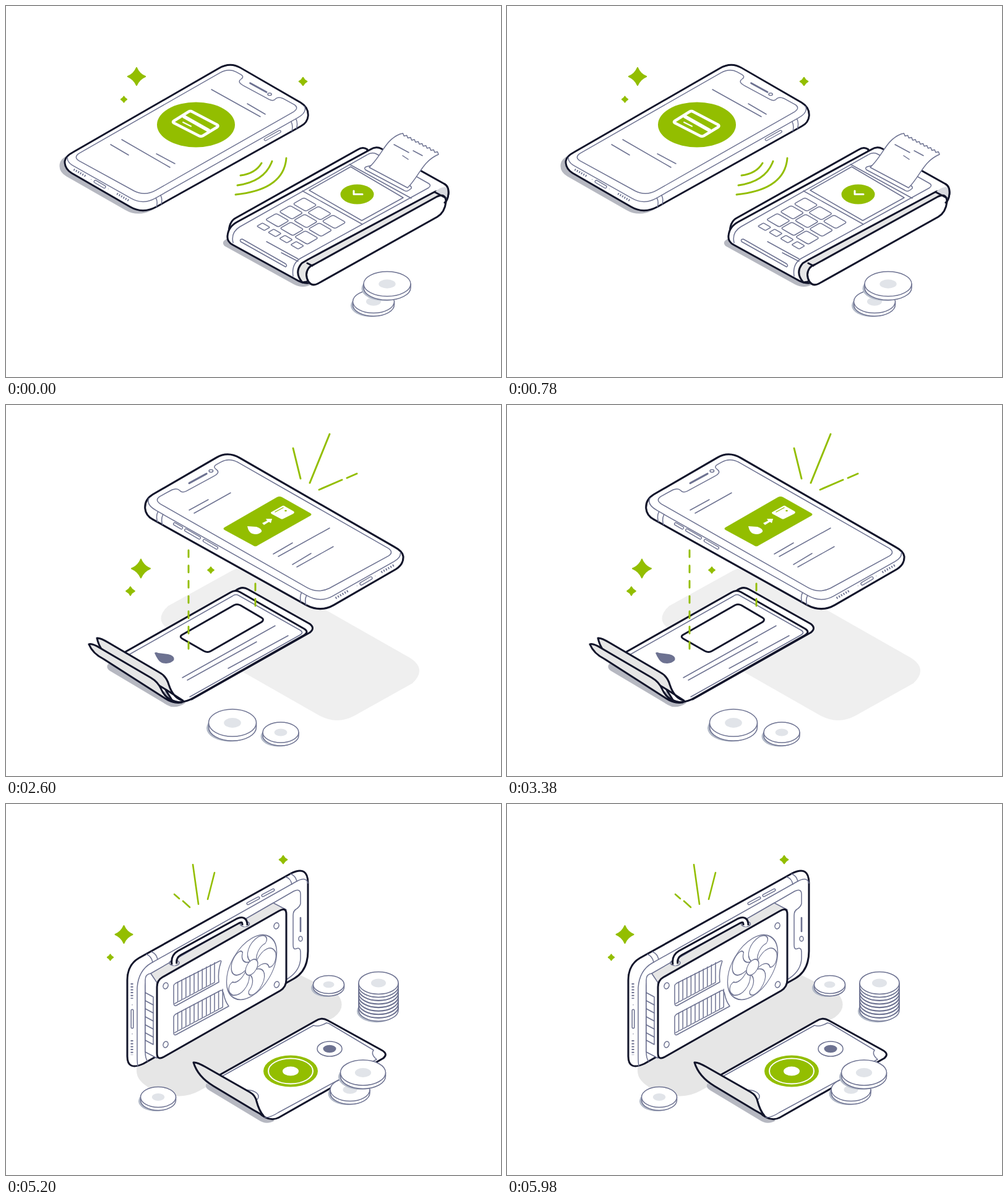
An HTML page that plays this animation: 800x600 px, repeating every 6500 ms.

```html
<!DOCTYPE html>
<html lang="en">
<head>
<meta charset="utf-8">
<title>Wallet scenes</title>
<style>
  html, body { margin: 0; width: 100%; height: 100%; overflow: hidden; background: #fff; }
  svg { display: block; width: 800px; height: 600px; }
  path, ellipse { stroke-linecap: round; stroke-linejoin: round; }
  .ink { fill: none; stroke: #12152b; stroke-width: 3; }
  .thin { fill: none; stroke: #6d7291; stroke-width: 1.5; }
  .ray { fill: none; stroke: #93be00; stroke-width: 2.9; }
  .white { fill: none; stroke: #fff; stroke-width: 2; }
  .paper { fill: #fff; }
  .pale { fill: #e6e6e6; }
  .green { fill: #93be00; }
  .slate { fill: #6d7291; }
  .shade { fill: #b6b8c1; }
  .phone .ink { stroke-width: 3.4; }
  .phone .thin { stroke-width: 1.7; }
  .scene { visibility: hidden; animation: show 6.5s step-end infinite; }
  @keyframes show {
    0% { visibility: visible; }
    20%, 100% { visibility: hidden; }
  }
</style>
</head>
<body>
<svg id="stage" viewBox="0 0 800 600"></svg>
<script>
const path = (cls, d, more = '') => `<path class="${cls}" d="${d}" ${more}/>`;
const oval = (cls, x, y, rx, ry, more = '') =>
  `<ellipse class="${cls}" cx="${x}" cy="${y}" rx="${rx}" ry="${ry}" ${more}/>`;

// Segments as "x1 y1 x2 y2, ...", with an optional stroke width
const lines = (cls, list, width) => path(cls, list.split(',').map(s => {
  const [a, b, c, d] = s.trim().split(' ');
  return `M${a} ${b}L${c} ${d}`;
}).join(''), width ? `style="stroke-width:${width}"` : '');

const star = (x, y, r) => {
  const k = r * .27, e = r - 1;
  return path('green', `M0 ${-e}Q${k} ${-k} ${e} 0Q${k} ${k} 0 ${e}Q${-k} ${k} ${-e} 0Q${-k} ${-k} 0 ${-e}Z`,
    `transform="translate(${x} ${y})" stroke="#93be00" stroke-width="2"`);
};

const disc = (x, y, rx, ry, t) => path('paper thin',
  `M${x - rx} ${y}v${t}a${rx} ${ry} 0 0 0 ${2 * rx} 0v${-t}`) + oval('paper thin', x, y, rx, ry);

const coin = (x, y, rx, ry, t) =>
  oval('', x - 3.5, y + t + 1.5, rx, ry, 'fill="#b3bac8"') + disc(x, y, rx, ry, t) +
  oval('', x, y, rx * .36, ry * .36, 'fill="#e1e4e9"');

// Rounded rectangle lying on the ground plane, a wide and b deep
const key = (x, y, a, b) => {
  const at = (u, v) => `${x + (u * a - v * b) / 2} ${y + (u * a + v * b) * .29}`;
  const s = .72;
  return path('thin', `M${at(-s, -1)}L${at(s, -1)}Q${at(1, -1)} ${at(1, -s)}L${at(1, s)}Q${at(1, 1)} ${at(s, 1)}` +
    `L${at(-s, 1)}Q${at(-1, 1)} ${at(-1, s)}L${at(-1, -s)}Q${at(-1, -1)} ${at(-s, -1)}Z`);
};

const keys = (x, y, cols, rows, col, row, a, b) => {
  let out = '';
  for (let r = 0; r < rows; r++)
    for (let c = 0; c < cols; c++)
      out += key(x + c * col[0] + r * row[0], y + c * col[1] + r * row[1], a, b);
  return out;
};

// Sawtooth edge from one point to another, as path commands
const teeth = (x1, y1, x2, y2, n, depth) => {
  const dx = (x2 - x1) / n, dy = (y2 - y1) / n, len = Math.hypot(dx, dy);
  const nx = -dy / len * depth, ny = dx / len * depth;
  let d = '';
  for (let i = 0; i < n; i++)
    d += `L${x1 + dx * (i + .5) + nx} ${y1 + dy * (i + .5) + ny}L${x1 + dx * (i + 1)} ${y1 + dy * (i + 1)}`;
  return d;
};

const grille = d => path('thin', d, 'style="stroke-width:4;stroke-linecap:butt" stroke-dasharray="2 2.7"');

const button = (x1, y1, x2, y2, w = 5) =>
  lines('thin', `${x1} ${y1} ${x2} ${y2}`, w) + lines('white', `${x1} ${y1} ${x2} ${y2}`, w - 3);

const phone = (matrix, { shadow = true, mirrored = false } = {}) => `<g class="phone" transform="matrix(${matrix})">` +
  (shadow ? path('shade', 'M152 338Q134 346 134 358Q133 371 147 379L259 443Q283 457 310 443L320 430Z') : '') +
  path('paper ink', 'M160 333L436 174Q458 161 478 173L592 239Q607 248 606 264Q605 277 592 284L318 437Q292 451 268 437L157 373Q143 364 144 350Q145 341 160 333Z') +
  path('thin', 'M149 343Q148 352 160 359L270 421Q293 434 317 420L586 268Q605 257 599 246') +
  path('thin', 'M170 336L439 182Q456 173 470 181L479 186Q485 190 479 194Q470 200 484 207L532 233Q540 237 544 232Q549 227 558 231L580 243Q589 249 579 256L316 406Q296 417 276 407L170 349Q161 343 170 336Z') +
  lines('thin', '496 202 527 219', 3.4) +
  (mirrored ? oval('thin', 488, 197, 3.6, 2.3) : oval('thin', 533, 223, 3.6, 2.3)) +
  path('thin', 'M317 420Q321 428 318 437M326 415Q330 423 327 432M574 275Q578 284 575 293M583 270Q587 278 584 288') +
  (mirrored ? button(541, 299, 553, 292, 6) + button(509, 317, 533, 303, 6) + button(478, 335, 500, 322, 6)
            : button(525, 309, 552, 294, 6)) +
  grille('M161 366L185 379.500M243 412L267 426') +
  button(202, 389, 219, 399, 6.5) +
  path('slate', 'M193.500 384.500h1.200v1h-1.200zM226 402.500h1.200v1h-1.200z') + '</g>';

const checkout = () =>
  phone('.851 0 0 .851 -27.5 -47.1') +
  oval('green', 307, 192, 63, 36.5) +
  path('white', 'M271 186L295 171Q298 169 301 171L341 192Q344 194 341 196L318 210Q315 211.500 312 210L271 189Q269 187.500 271 186Z', 'style="stroke-width:4.6"') +
  lines('white', '288 179 327 201', 6) +
  lines('white', '286 188 299 194.5') +
  lines('thin', '332 135 411 179, 390 158 419 175, 187 216 265 261, 169 224 198 241, 243 239 273 255') +
  path('ray', 'M379 274Q403 271 413 254M374 290Q418 284 430 251M371 305Q449 297 453 246') +
  star(211, 114, 15.2) + star(480, 122, 7.3) + star(190.5, 151, 5.6) +
  // card terminal
  path('shade', 'M361 375Q346 380 353 388L465 450Q480 458 494 450L480 440Z') +
  path('paper ink', 'M360 368Q360 349 371 343L569 232Q577 227 584 232L584 250Z') +
  path('paper ink', 'M358 372Q359 357 374 349L589 232Q598 226 607 231L709 288Q716 292 715 304Q714 314 708 320L497 446Q484 452 468 442L366 386Q357 381 358 372Z') +
  path('thin', 'M367 383Q363 366 378 357L583 241Q592 235 600 240L683 287Q688 290 683 294L476 408Q461 417 464 437') +
  lines('thin', '479 299 576 353, 555 256 655 311') +
  path('thin', 'M490 298L557 260L642 310L575 347Z') +
  oval('green', 567.5, 304.5, 27, 16) + path('white', 'M562 299V304.500H576', 'style="stroke-width:3"') +
  keys(483, 321, 3, 3, [23.5, 14], [-22.3, 12.7], 20.5, 17.5) +
  keys(416, 357, 4, 1, [18.2, 10], [0, 0], 12, 9) +
  lines('thin', '421 381 472 409, 445 399 472 413') +
  path('thin', 'M382 377L452 417Q455 420 452 422L379 381Q377 377 382 377Z') +
  path('pale ink', 'M479 447Q465 431 478 416L488 410L690 302Q701 295 711 306L497 436L486 446Z') +
  path('', 'M693 301Q704 290 714 294Q715 310 710 314Z', 'fill="#d8d9df"') +
  path('paper ink', 'M498 418L697 308Q711 302 711 317Q709 334 697 341L504 449Q495 454 489 446Q482 434 489 424Q492 420 498 418Z') +
  path('ink', 'M487 416L495 420M693 301L710 310M709 288Q716 292 715 304Q714 314 709 318') +
  // receipt
  path('paper thin', 'M582 260Q578 262 581 265L643 298Q647 301 651 298L655 295Q656 292 652 290L590 258Z') +
  path('paper thin', `M587 261C609 240 612 217 637 207${teeth(637, 207, 699, 240, 10, -3)}C673 251 668 275 649 294Z`) +
  lines('thin', '627 224 651 237, 658 234 673 242, 641 242 650 248') +
  coin(594, 478, 33.5, 18.5, 5) + coin(616, 449.5, 38, 20, 6);

const transfer = () =>
  phone('.879 0 0 .872 -11.6 -8.1') +
  lines('white', '374 315 413 293', 8) +
  path('paper ink', 'M368 318L376 313Q382 309 388 312L399 318L389 325L430 324L434 299L425 304L415 299Q408 295 414 291L422 287') +
  oval('green', 346, 229.5, 55.5, 32) + oval('white', 346, 229.5, 48.5, 27.5) +
  path('white', 'M336 218V233.500H367', 'style="stroke-width:4.2"') +
  lines('thin', '244 239 275 256, 235 246 317 291, 224 250 255 267, 219 286 273 316, 250 294 281 311') +
  lines('ray', '469 110 462 142, 475 152 539 116, 495 164 518 160, 526 158 540 156') +
  star(102, 248, 15.7) + star(81, 286, 5.7) + star(390, 108, 7.8) +
  coin(603.5, 203, 37, 21, 6) + coin(215, 439, 30, 17.5, 4.5) +
  phone('.879 0 0 .872 192.4 106.9') +
  lines('thin', '422 355 538 420') +
  keys(422, 374.5, 6, 3, [16, 9.1], [-17.5, 9.6], 11, 9) +
  path('thin', 'M374 414L382 409L441 441L433 446Z') +
  path('paper thin', 'M510 320L522 312Q532 305 544 311L585 333Q597 341 588 348L577 354Q566 360 555 354L512 331Q502 326 510 320Z') +
  lines('thin', '532 315 568 335, 524 318 542 328, 523 325 539 335') +
  path('paper thin', 'M494 362L503 356Q514 348 526 355L564 375Q575 382 566 389L556 394Q546 399 534 393L495 373Q486 368 494 362Z') +
  lines('thin', '519 371 534 379, 530 363 543 370, 537 376 557 388') +
  path('green', 'M587 308L598 302Q606 297 616 302L659 324Q668 330 660 336L650 343Q641 348 631 344L588 322Q579 316 587 308Z') +
  path('paper', 'M593 313L601 306L621 316L613 322Z') +
  oval('green', 612, 315.5, 1.4, 1) +
  lines('white', '629 321 646 331, 624 325 637 332');

const sweep = () =>
  path('', 'M262 325L365 268Q385 258 405 268L653 409Q681 427 657 450L564 502Q535 518 506 502L264 364Q238 347 262 325Z', 'fill="#efefef"') +
  path('shade', 'M166 418Q160 424 168 430L260 485Q273 493 290 482L270 470Z') +
  path('paper ink', 'M190 404L370 301Q381 292 391 298L491 354Q500 361 491 368L300 476Z') +
  path('paper ink', 'M188 402L363 303Q371 298 379 303L482 362Q490 367 482 372L304 473Q288 483 270 480L245 440Z') +
  path('thin', 'M200 403L366 309Q371 305 376 308L475 364Q482 368 475 372L297 472') +
  path('pale ink', 'M147 377Q152 376 165 384L247 432Q259 438 263 452Q270 474 286 478L258 460L172 410Q152 400 147 377Z') +
  path('pale ink', 'M134 387Q139 385 152 393L234 441Q246 448 251 460Q260 480 284 481Q270 483 258 475L158 411Q140 402 134 387Z') +
  path('paper ink', 'M284 372L368 324Q373 321 379 324L413 344Q418 347 413 351L331 398Q326 401 320 398L285 378Q280 375 284 372Z') +
  path('slate', 'M240 401Q242 399 246 401L262 403Q274 406 271 413Q264 420 252 417Q246 415 240 401Z') +
  lines('thin', '285 441 435 357, 293 445 405 383, 359 426 456 373') +
  path('ray', 'M295 235V395', 'stroke-dasharray="11 13.7"') +
  path('ray', 'M403 289V325', 'stroke-dasharray="11 13.7"') +
  phone('-.903 0 0 .903 772 -71.3', { shadow: false, mirrored: true }) +
  path('green', 'M353 198L438 149Q442 147 446 149L492 175Q495 177 492 179L407 227Q403 230 399 227L353 202Q350 200 353 198Z') +
  path('paper', 'M390 196L405 197Q414 200 413 205Q407 211 398 208Q392 206 390 196Z') +
  path('paper', 'M414 191L422 187L420 184L430 184L428 191L425 189L417 194Z') +
  path('paper', 'M429 173L447 163Q449 162 451 164L465 172Q467 174 464 176L448 184Q446 185 444 184L429 176Q427 174 429 173Z') +
  oval('green', 452, 171, 1.8, 1.3) + lines('ray', '435 173 448 166', 1.4) +
  lines('thin', '296 170 327 153, 304 175 363 142, 432 241 463 223, 440 245 523 199, 463 258 493 240, 470 262 529 229') +
  lines('ray', '464 70 476 119, 523 47 491 126, 506 137 543 121, 551 118 567 111') +
  star(218, 264.5, 16) + star(201, 301, 7.8) + star(331, 267, 5.8) +
  coin(366, 514, 38.5, 22, 7) + coin(444, 529.5, 29, 16.5, 5);

const vault = () =>
  path('paper ink', `M137 291${teeth(137, 291, 353, 167, 18, 5)}L403 195L180 319L136 294Z`) +
  lines('thin', '179 294 230 265, 187 298 213 284') +
  path('paper', 'M350 419L418 455Q427 459 438 453L620 330L565 299Z') +
  path('pale', 'M350 416L375 431L590 312L566 299Z') +
  path('ink', 'M350 419L416 454Q427 460 438 453M565 299L620 330') +
  path('pale ink', 'M438 453Q445 448 451 433Q455 421 464 417L650 310Q663 303 668 306Q668 315 660 325Q656 331 646 335Z') +
  [0, 1, 2, 3, 4].map(i => oval('thin', 416 + i * 18.9, 422 - i * 10.7, 8.8, 5)).join('') +
  lines('thin', '504 365 538 347, 512 371 578 334') +
  phone('1 0 0 1 0 0') +
  lines('thin', '411 219 445 237, 426 210 518 262, 492 238 526 256, 244 313 336 364, 311 341 345 360') +
  [0, 1, 2, 3].map(i => oval('green', 213.5 + i * 26.6, 338.5 + i * 15, 12.2, 7)).join('') +
  oval('paper', 266.7, 368.5, 7, 3.6) +
  // dial
  oval('paper thin', 375, 293, 63, 34.5) +
  path('paper thin', 'M320 277L337 259H414L430 277') +
  path('paper', 'M321 279L338 255H412L429 279Q410 305 375 305Q340 305 321 279Z') +
  path('paper thin', 'M333 262Q326 266 327 277Q331 302 375 303Q419 302 423 277Q424 266 417 262') +
  path('paper', 'M337 235H413V272Q396 290 375 290Q352 290 337 272Z') +
  path('thin', 'M336 235V274M414 235V274M342 283Q375 303 409 283') +
  oval('paper thin', 375, 235.5, 39, 23) + oval('slate', 374.5, 234.5, 26.5, 14) +
  lines('thin', '344 251 344 267, 353 257 353 275, 362 267 362 278, 372 259 372 279, 382 258 382 277, 391 257 391 275, 401 252 401 267') +
  lines('ray', '546 136 539 173, 553 184 627 142, 576 198 602 193, 612 191 628 189', 3.2) +
  star(339, 118, 17.7) + star(396, 141, 8.7) + star(302.5, 157, 6.2) +
  coin(223.5, 168, 43, 24.5, 7) + coin(587.5, 468, 39, 22.5, 6) + coin(613, 436, 44, 24, 7);

const slats = (top, bottom, slope, n) => {
  let d = '';
  for (let i = 1; i <= n; i++) {
    const x = 271 + i * 6.6, rise = slope * (x - 274);
    d += `M${x} ${top - rise}V${bottom - rise - 4}l-5 2.700`;
  }
  return path('thin', d);
};

const fan = () => {
  let blades = '';
  for (let a = 0; a < 360; a += 72)
    blades += path('thin', 'M-4-11C-15-24-10-41 9-44C25-43 28-33 23-28C14-28 7-20 8-9', `transform="rotate(${a + 5})"`);
  return `<g transform="matrix(.866 -.5 0 1 397 264)">${oval('paper thin', 0, 0, 46.8, 46.8)}${blades}${oval('paper thin', 0, 0, 11.5, 11.5)}</g>`;
};

const mining = () => {
  const handle = 'M272 259Q270 247 280 241L375 189Q386 184 386 196';
  const screws = [[258, 294], [258, 389], [437, 197], [437.5, 292]];
  return path('pale', 'M212 424Q206 446 235 461L258 469Q288 478 314 463L530 345Q553 328 534 305L470 274Z') +
    path('paper ink', 'M196 285Q196 260 215 249L461 112Q488 99 488 128V238Q488 269 466 282L222 420Q196 432 196 408Z') +
    path('thin', 'M213 424Q212 418 212 408V297Q214 269 235 257L468 126Q485 116 488 128') +
    path('thin', 'M229 416Q225 412 225 400V294Q226 279 240 271L465 141Q476 136 476 146V161Q475 166 469 170Q464 173 464 180V228Q464 236 469 234Q476 231 476 240V250Q475 271 453 284') +
    path('thin', 'M227 243Q235 246 237 256M235 239Q243 242 245 251M452 118Q460 120 462 130M460 113Q468 116 470 125') +
    button(391, 161, 408, 152) + button(415, 148, 432, 139) +
    lines('thin', '476 184 476 206', 2.6) + oval('thin', 476, 218, 3, 4) +
    grille('M203.500 290V315M203.500 382V406') +
    button(204, 334, 204, 361, 5) + path('slate', 'M203.500 324h1v1.500h-1zM203.500 371h1v1.500h-1z') +
    // graphics card
    path('paper thin', 'M225 285Q225 275 234 274L244 288V411L225 401Z') +
    path('paper thin', 'M225 305L238 312V389L225 382Z') +
    path('thin', [0, 1, 2, 3, 4].map(i => `M225 ${318 + i * 13}l13 7`).join('')) +
    path('pale thin', 'M234 274L432 160L453 171L244 289Z') +
    path('paper ink', 'M244 296Q244 285 253 280L441 173Q453 166 453 178V284Q453 296 443 302L255 409Q244 415 244 403Z') +
    oval('thin', 272, 257, 8, 4.5) + oval('thin', 386, 194, 7.5, 4.5) +
    path('ink', handle, 'style="stroke-width:11;stroke-linecap:butt"') +
    path('white', handle, 'style="stroke-width:5"') +
    screws.map(([x, y]) => oval('thin', x, y, 3.9, 5, `transform="rotate(20 ${x} ${y})"`)).join('') +
    path('thin', 'M271 294Q271 292 274 290L345 254Q349 252 347 257Q342 272 344 288L275 326Q271 327 271 322Z') +
    slats(290, 326, .53, 10) +
    path('thin', 'M271 345Q271 342 274 340L346 302Q350 299 352 308Q354 319 360 327L275 373Q271 375 271 370Z') +
    slats(340, 373, .53, 12) +
    fan() +
    // banknote
    path('shade', 'M324 452Q320 459 330 464L408 511Q421 520 434 512L400 490Z') +
    path('paper ink', 'M342 440L500 351Q510 344 520 350L607 398Q618 404 610 411L441 507Q428 514 413 503Z') +
    path('thin', 'M348 441L497 358Q506 361 518 354L522 355L594 398Q589 405 599 413L440 499Q428 507 418 507') +
    oval('thin', 523, 396, 20, 12) + oval('slate', 523, 396, 10.5, 6.2) +
    oval('thin', 389, 473, 19, 10.5) + oval('slate', 389, 473, 9.5, 5) +
    path('pale ink', 'M303 418Q308 417 322 425L394 466Q403 471 405 481Q409 496 416 504L400 495L335 456Q310 441 303 418Z') +
    oval('green', 460, 432, 44, 25.5) + oval('white', 460, 432, 36, 20.5) + oval('paper', 460, 432, 13, 7.5) +
    lines('ray', '302 98 311 162, 337 111 326 154, 272 146 280 153, 286 157 297 167', 2.6) +
    star(190.5, 211, 15) + star(448, 90, 7.3) + star(168.5, 248, 5.6) +
    coin(521.5, 292, 25, 14.5, 4) +
    oval('', 599, 335, 32, 18.5, 'fill="#b3bac8"') +
    [7, 6, 5, 4, 3, 2, 1].map(i => disc(602, 289 + i * 5.6, 32, 18, 5)).join('') +
    disc(602, 289.5, 32, 18, 5) + oval('', 602, 289.5, 12, 7, 'fill="#e1e4e9"') +
    coin(246, 474, 28.5, 16.5, 5) + coin(556, 462, 32, 18.5, 5) + coin(577, 434.5, 36.5, 20.5, 5.5);
};

document.getElementById('stage').innerHTML = [checkout, transfer, sweep, vault, mining].map((draw, i) =>
  `<g class="scene" style="animation-delay:${i * 1.3 - 6.5}s">${draw()}</g>`).join('');
</script>
</body>
</html>
```
